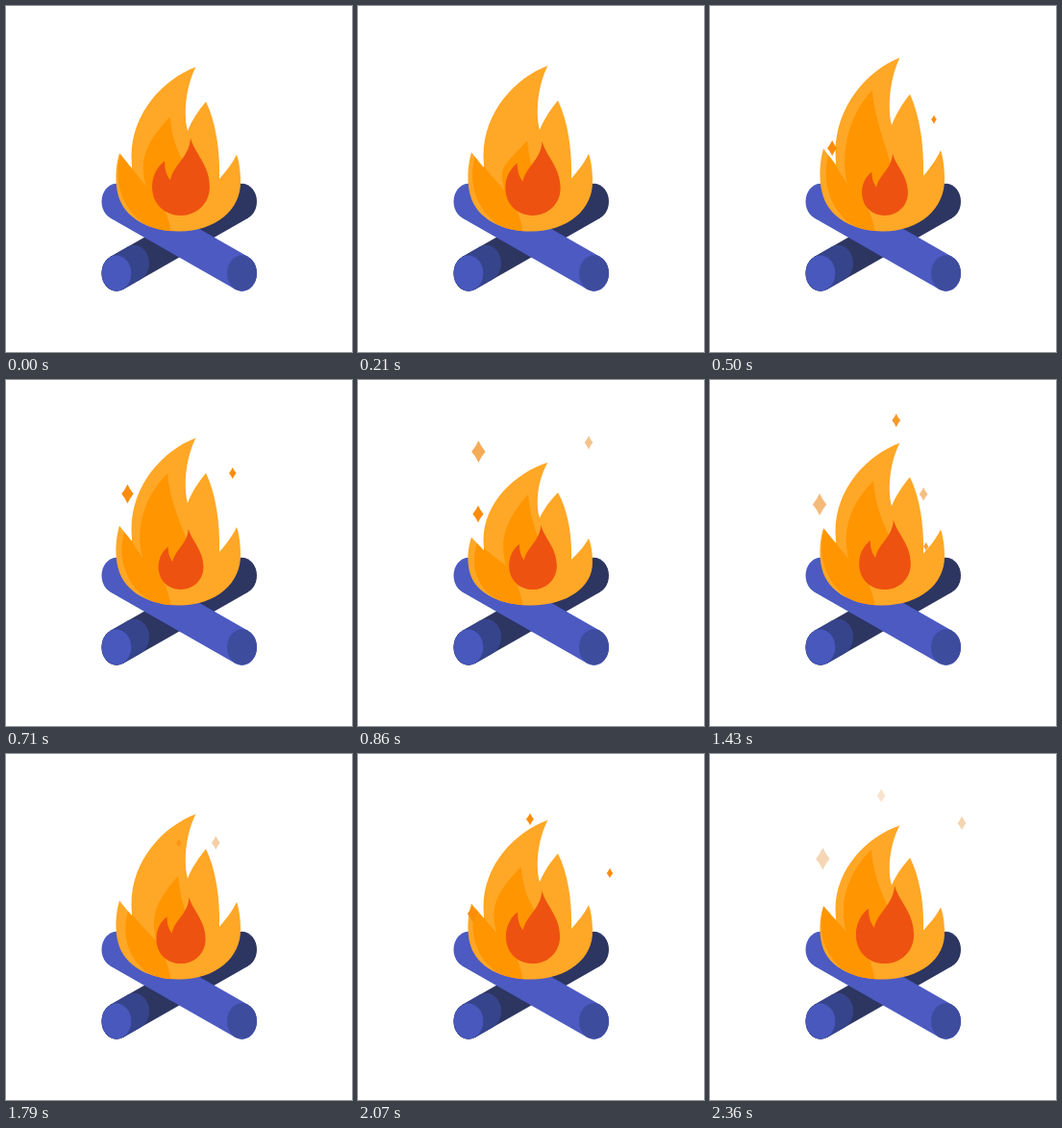
Write an HTML page with a canvas that moves like this. It is 360 by 360 pixels and loops after 2.43 s.

```html
<!DOCTYPE html>
<html lang="en">
<head>
<meta charset="utf-8">
<title>Campfire</title>
<style>
html, body { margin: 0; width: 100%; height: 100%; overflow: hidden; background: #fff; }
canvas { display: block; width: 100vmin; height: 100vmin; }
</style>
</head>
<body>
<canvas id="stage"></canvas>
<script>
const LOOP = 2430, STEPS = 34, STEP = 71.5, SIZE = 360, GROUND = 234.5;
const canvas = document.getElementById('stage');
const ctx = canvas.getContext('2d');
const ratio = window.devicePixelRatio || 1;
canvas.width = canvas.height = SIZE * ratio;

const FLAME = new Path2D(`M197.500 63.500 C164 76 130.500 111 130.500 157 L131 169
  C126 163 121 157 118 153 C113.500 168 113.500 184 116.500 196
  C123 222 151 234.500 180 234.500 C218 234.500 245 212 244 182
  C244 170 242 160 240 154.500 C235 165 228 173 222 180
  C223 150 218 120 208 99.500 C200 109 193 120 189 130
  C184 110 188 82 197.500 63.500 Z`);

const CORE = new Path2D(`M192 137 C196 153 212 165 212 188
  C212 206 198 218 182 218 C165 218 152 206 152 188
  C152 177 157 167 165 161 C165 170 167 176 171 181
  C174 165 191 157 192 137 Z`);

// Flame height at its turning points: [time, height].
const PULSE = [[0, 170], [550, 180], [860, 148], [1150, 180], [1430, 168], [1790, 171], [2350, 159], [LOOP, 170]];

// [birth, life, x, drift, y, rise]
const SPARKS = [
  [320, 720, 128, -3.5, 185, 148],
  [400, 560, 231, 11, 133, 83],
  [640, 640, 126, -3, 184, 131],
  [980, 560, 214.5, 9.5, 220, 126],
  [1130, 380, 118, -5, 188, 74],
  [1100, 480, 191, 4, 110, 99],
  [1360, 500, 226, -9, 189, 113],
  [1700, 720, 180, -2, 100, 62],
  [1930, 495, 262, 0, 150, 90],
  [1930, 490, 120, -3, 195, 98]
];

const { sin, cos, PI } = Math;
const mix = (a, b, u) => a + (b - a) * u;
const clamp = v => Math.max(0, Math.min(1, v));

function flameHeight(t) {
  const i = PULSE.findIndex(k => k[0] > t);
  const [t0, a] = PULSE[i - 1], [t1, b] = PULSE[i];
  return mix(a, b, (1 - cos(PI * (t - t0) / (t1 - t0))) / 2);
}

function ellipse(x, y, rx, ry, color) {
  ctx.fillStyle = color;
  ctx.beginPath();
  ctx.ellipse(x, y, rx, ry, 0, 0, PI * 2);
  ctx.fill();
}

// Hull of two equal ellipses.
function log(x0, y0, x1, y1, color) {
  const rx = 15.5, ry = 18.7;
  const nx = y0 - y1, ny = x1 - x0, d = Math.hypot(rx * nx, ry * ny);
  const px = rx * rx * nx / d, py = ry * ry * ny / d;
  ellipse(x0, y0, rx, ry, color);
  ellipse(x1, y1, rx, ry, color);
  ctx.beginPath();
  ctx.moveTo(x0 + px, y0 + py);
  ctx.lineTo(x1 + px, y1 + py);
  ctx.lineTo(x1 - px, y1 - py);
  ctx.lineTo(x0 - px, y0 - py);
  ctx.fill();
}

function drawLogs() {
  log(245.5, 203.5, 115, 278, '#2d3561');
  log(133.5, 267.5, 115, 278, '#36448c');
  ellipse(115, 278, 15.3, 18.5, '#4958bd');
  log(115, 203.5, 245.5, 278, '#4c5ac2');
  ellipse(245.5, 278, 15.5, 18.7, '#3e4c9e');
}

// Darker inner layer: a side tongue and a taller one that sways.
function drawTongues(a, height) {
  const sway = 0.45 + 0.48 * sin(3 * a) - 0.22 * cos(a);
  const tipX = 168 + 12 * sway;
  const tipY = 112 + 5 * cos(a + 0.87) + 16 * sin(3 * a) + 12 * sin(4 * a);
  const edge = 139 + 16 * sway;
  const sideX = 122.5 - 3 * cos(2 * a) + 2 * sin(3 * a);
  const sideY = GROUND - 0.475 * height + 1.2 * (sideX - 120);
  const vx = edge + 3, vy = 185 + 11 * sway;
  ctx.fillStyle = '#ff9500';
  ctx.beginPath();
  ctx.moveTo(172, 236);
  ctx.bezierCurveTo(sideX + 8, 232, sideX - 11, sideY + 35, sideX, sideY);
  ctx.quadraticCurveTo(mix(sideX, vx, 0.45), mix(sideY, vy, 0.5), vx, vy);
  ctx.bezierCurveTo(edge - 4, vy - 25, edge + 1, tipY + 28, tipX, tipY);
  ctx.bezierCurveTo(tipX + 2, tipY + 22, tipX + 7, tipY + 38, 190, 170);
  ctx.lineTo(182, 205);
  ctx.lineTo(158, 200);
  ctx.quadraticCurveTo(168, 213, 172, 236);
  ctx.fill();
}

function drawFire(t) {
  const a = 2 * PI * t / LOOP;
  const height = flameHeight(t), tall = height / 170;

  ctx.save();
  ctx.translate(0, GROUND * (1 - tall));
  ctx.scale(1, tall);
  ctx.fillStyle = '#ffa726';
  ctx.fill(FLAME);
  ctx.clip(FLAME);
  ctx.scale(1, 1 / tall);
  ctx.translate(0, -GROUND * (1 - tall));
  drawTongues(a, height);
  ctx.restore();

  ctx.save();
  const k = (72 + 3.2 * cos(a) - 3.1 * sin(a) + 5.6 * cos(2 * a) - sin(2 * a)) / 81;
  ctx.translate(182, 218);
  ctx.scale(k, k);
  ctx.translate(-182, -218);
  ctx.fillStyle = '#ee5210';
  ctx.fill(CORE);
  ctx.restore();
}

function drawSpark([birth, life, x0, drift, y0, rise], t) {
  const u = (t - birth) / life;
  if (u <= 0 || u >= 1) return;
  const x = x0 + drift * u, y = y0 - rise * u;
  const w = (x0 < 130 ? 7.2 : 4.4) * Math.min(1, 0.5 + 0.8 * u), h = w * 1.6;
  const fade = clamp((u - 0.65) / 0.35);
  ctx.globalAlpha = clamp(u * 6) * (1 - fade);
  ctx.fillStyle = `rgb(${mix(251, 215, fade)},140,${mix(12, 60, fade)})`;
  ctx.beginPath();
  ctx.moveTo(x, y - h);
  for (const [sx, sy] of [[1, -1], [1, 1], [-1, 1], [-1, -1]]) {
    const [ex, ey] = sx * sy < 0 ? [x + sx * w, y] : [x, y + sy * h];
    ctx.quadraticCurveTo(x + sx * w * 0.42, y + sy * h * 0.42, ex, ey);
  }
  ctx.fill();
  ctx.globalAlpha = 1;
}

const start = performance.now();

function draw() {
  const elapsed = (performance.now() - start) % LOOP;
  const t = Math.min(STEPS - 1, Math.floor((elapsed + 3) / STEP)) * STEP;
  ctx.setTransform(ratio, 0, 0, ratio, 0, 0);
  ctx.fillStyle = '#fff';
  ctx.fillRect(0, 0, SIZE, SIZE);
  drawLogs();
  drawFire(t);
  SPARKS.forEach(s => drawSpark(s, t));
  requestAnimationFrame(draw);
}
draw();
</script>
</body>
</html>
```
